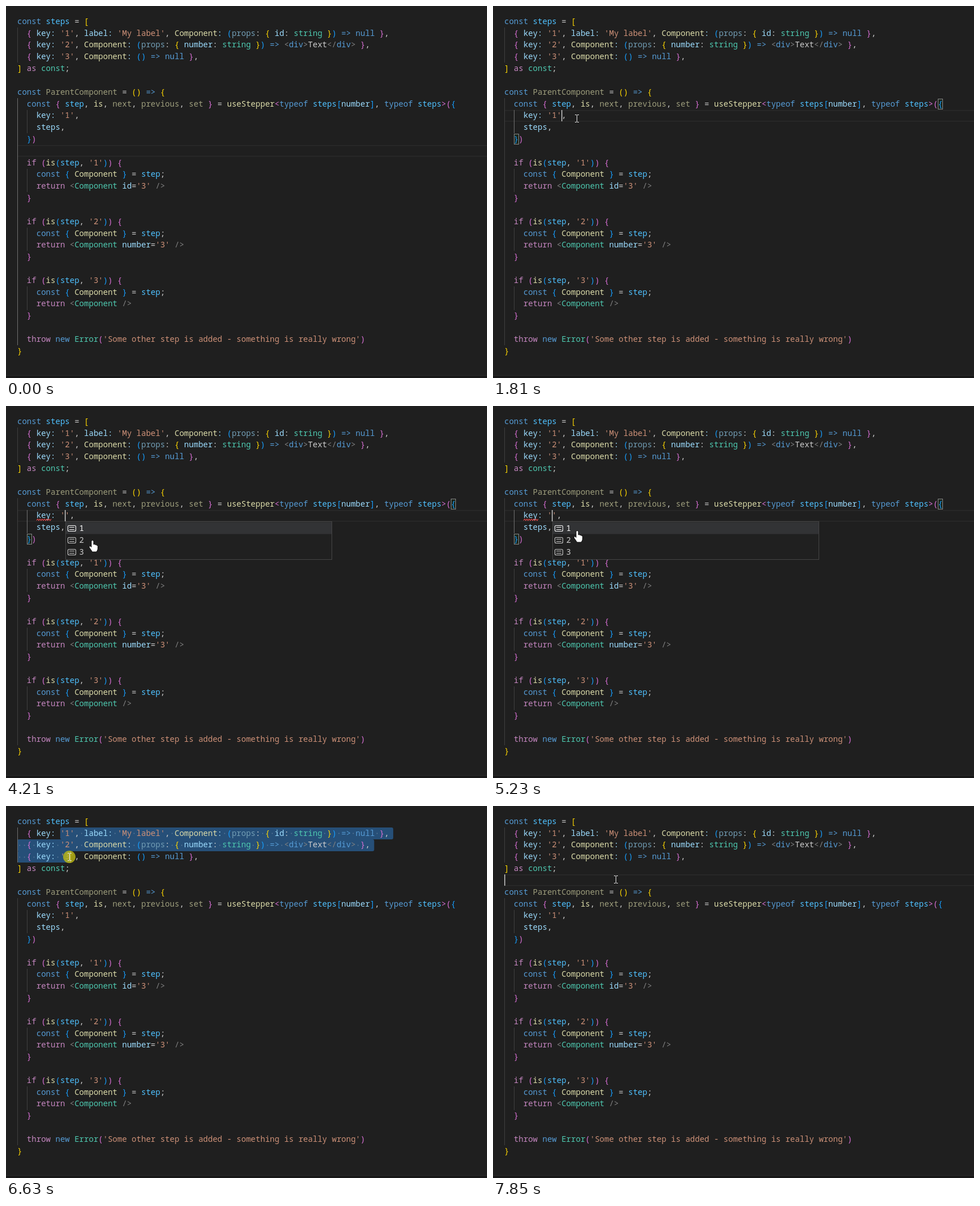
Write an HTML page with a canvas that moves like this. It is 851 px wide and 658 px high and loops after 8000 ms.

```html
<!DOCTYPE html>
<html lang="en">
<head>
<meta charset="utf-8">
<title>Typed stepper</title>
<style>
html, body { margin: 0; width: 100%; height: 100%; overflow: hidden; background: #1f1f1f; }
canvas { display: block; }
</style>
</head>
<body>
<canvas id="stage" width="851" height="658"></canvas>
<script>
const ctx = document.getElementById('stage').getContext('2d');
const LOOP = 8000, LEFT = 20, TOP = 17.2, BASELINE = 31.85, CHAR = 8.431, ROW = 20.814;
const FONT = '14.05px "Noto Sans Mono", "DejaVu Sans Mono", monospace';
const KEY_ROW = 8;

const COLORS = {
  k: '#569cd6', v: '#4fc1ff', p: '#9cdcfe', s: '#ce9178', f: '#dcdcaa',
  t: '#4ec9b0', c: '#c586c0', w: '#cccccc', g: '#808080', u: '#9d9d7c',
  q: '#729db4', 1: '#ffd700', 2: '#da70d6', 3: '#179fff'
};

// "~x" switches to colour x
const branch = (key, attr) => [
  `  ~cif ~2(~fis~3(~vstep~w, ~s'${key}'~3)~2) {`,
  '    ~kconst ~3{ ~fComponent ~3} ~w= ~vstep~w;',
  `    ~creturn ~g<~tComponent ${attr ? `~p${attr}~w=~s'3' ` : ''}~g/>`,
  '  ~2}',
  ''
];
const SOURCE = [
  '~kconst ~vsteps ~w= ~1[',
  "  ~2{ ~pkey: ~s'1'~w, ~plabel: ~s'My label'~w, ~fComponent~p: ~3(~qprops~w: ~1{ ~pid~w: ~tstring ~1}~3) ~k=> null ~2}~w,",
  "  ~2{ ~pkey: ~s'2'~w, ~fComponent~p: ~3(~qprops~w: ~1{ ~pnumber~w: ~tstring ~1}~3) ~k=> ~g<~kdiv~g>~wText~g</~kdiv~g> ~2}~w,",
  "  ~2{ ~pkey: ~s'3'~w, ~fComponent~p: ~3() ~k=> null ~2}~w,",
  '~1] ~cas ~tconst~w;',
  '',
  '~kconst ~uParentComponent ~w= ~1() ~k=> ~1{',
  '  ~kconst ~2{ ~vstep~w, ~fis~w, ~unext~w, ~uprevious~w, ~uset ~2} ~w= ~fuseStepper~2<~ktypeof ~vsteps~3[~pnumber~3]~w, ~ktypeof ~vsteps~2>(~3{',
  "    ~pkey: ~s'1'~w,",
  '    ~psteps~w,',
  '  ~3}~2)',
  '',
  ...branch(1, 'id'), ...branch(2, 'number'), ...branch(3, ''),
  "  ~cthrow ~knew ~tError~2(~s'Some other step is added - something is really wrong'~2)",
  '~1}'
];

function parse(line) {
  const cells = [];
  let color = COLORS.w;
  for (let i = 0; i < line.length; i++) {
    if (line[i] === '~') color = COLORS[line[++i]];
    else cells.push({ ch: line[i], color });
  }
  return cells;
}
const CODE = SOURCE.map(parse);
const EMPTY_KEY = parse("    ~pkey: ~s''~w,");

// column, first row, last row
const GUIDES = [[0, 1, 3], [0, 7, 27], [2, 8, 9], [2, 13, 14], [2, 18, 19], [2, 23, 24]];
const CALL = [[7, 91], [10, 2]], ITEM = [[1, 2], [1, 76]];

// Each step keeps what the one before it set.
const STEPS = [
  [0, { line: 11, guide: 1 }],
  [200, { mouse: [437, 278] }],
  [400, { mouse: [352, 262] }],
  [600, { mouse: [262, 244] }],
  [800, { mouse: [196, 230] }],
  [1010, { mouse: [156, 220] }],
  [1210, { mouse: [141, 216] }],
  [1410, { mouse: [147, 201] }],
  [1610, { mouse: [148, 199], press: true, line: 8, caret: [8, 12], guide: 2, pair: CALL }],
  [1810, { press: false }],
  [2210, { caret: [8, 11] }],
  [2410, { caret: [8, 10], empty: true }],
  [2810, { popup: true }],
  [3410, { error: true }],
  [3610, { mouse: [148, 208] }],
  [3810, { mouse: [150, 222], hand: true }],
  [4030, { mouse: [153, 238] }],
  [4230, { mouse: [155, 248] }],
  [4430, { mouse: [155, 253] }],
  [4630, { mouse: [154, 250] }],
  [4830, { mouse: [153, 243] }],
  [5030, { mouse: [151, 231] }],
  [5230, { mouse: [149, 221] }],
  [5430, { press: true, popup: false, empty: false, caret: [8, 11] }],
  [5630, { press: false, hand: false, mouse: [119, 60] }],
  [5830, { mouse: [99, 50], error: false }],
  [6030, { press: true, line: 1, caret: [1, 9], guide: 0, pair: ITEM }],
  [6230, { mouse: [104, 49], line: -1, caret: [1, 10], select: [1, 10], quotes: true }],
  [6430, { mouse: [108, 70], caret: [2, 10], select: [2, 10], quotes: false, pair: [] }],
  [6630, { mouse: [112, 90], caret: [3, 11], select: [3, 11] }],
  [6830, { press: false, bulb: true }],
  [7230, { mouse: [172, 116] }],
  [7430, { mouse: [212, 133], caret: null }],
  [7650, { mouse: [217, 130], press: true, select: null, bulb: false, line: 5, caret: [5, 0], guide: -1 }],
  [7850, { press: false }]
];

const colX = c => LEFT + c * CHAR;
const rowY = r => Math.round(TOP + r * ROW);

function fill(x, y, w, h, color) {
  ctx.fillStyle = color;
  ctx.fillRect(x, y, w, h);
}
function disc(x, y, r, color) {
  ctx.fillStyle = color;
  ctx.beginPath();
  ctx.arc(x, y, r, 0, Math.PI * 2);
  ctx.fill();
}
function stroke(points, color, width) {
  ctx.strokeStyle = color;
  ctx.lineWidth = width;
  ctx.beginPath();
  points.forEach(([x, y]) => ctx.lineTo(x, y));
  ctx.stroke();
}
function glyph(ch, x, row, color) {
  ctx.fillStyle = color;
  ctx.fillText(ch, x, Math.round(BASELINE + row * ROW));
}

function drawLine(row) {
  const y = rowY(row);
  fill(LEFT, y, 851 - LEFT, 1.5, '#2a2a2a');
  fill(LEFT, y + 19, 851 - LEFT, 1.5, '#2a2a2a');
}

function drawSelection([endRow, endCol], rows) {
  for (let r = 1; r <= endRow; r++) {
    const from = r === 1 ? 9 : 0;
    const to = r === endRow ? endCol : rows[r].length;
    const tail = r === endRow ? 0 : 7.5;
    ctx.fillStyle = '#264f78';
    ctx.beginPath();
    ctx.roundRect(colX(from), rowY(r), (to - from) * CHAR + tail, rowY(r + 1) - rowY(r), 3);
    ctx.fill();
    for (let c = from; c < to; c++) {
      if (rows[r][c].ch === ' ') disc(colX(c + 0.5), rowY(r) + 10.5, 0.9, '#5b7a98');
    }
  }
}

function drawQuotes(rows) {
  rows.forEach((cells, r) => cells.forEach(({ ch }, c) => {
    if (ch === "'") fill(colX(c), rowY(r), CHAR, 20.5, '#363b40');
  }));
}

function drawGuides(active) {
  GUIDES.forEach(([col, first, last], i) => {
    const y = rowY(first);
    fill(Math.round(colX(col)), y, 1, rowY(last + 1) - y, i === active ? '#707070' : '#404040');
  });
}

function drawPair(pair) {
  ctx.lineWidth = 1;
  ctx.strokeStyle = '#888888';
  for (const [r, c] of pair) {
    const x = Math.round(colX(c)), y = rowY(r) + 1;
    fill(x, y, 9, 19, 'rgba(0,100,0,.1)');
    ctx.strokeRect(x + 0.5, y + 0.5, 8, 18);
  }
}

function drawError() {
  const wave = [];
  for (let x = 54; x <= 80; x += 2) wave.push([x, x % 4 ? 202.5 : 200]);
  stroke(wave, '#f14c4c', 1.1);
}

function drawPopup() {
  fill(105, 204, 472, 68, '#454545');
  fill(106, 205, 470, 66, '#202020');
  fill(106, 205.5, 470, 21, '#323335');
  for (let i = 0; i < 3; i++) {
    const y = Math.round(216 + i * ROW), color = i ? '#cccccc' : '#ffffff';
    ctx.strokeStyle = color;
    ctx.lineWidth = 1.1;
    ctx.beginPath();
    ctx.roundRect(109.5, y - 4.5, 14, 10, 2);
    ctx.stroke();
    fill(112, y - 2, 9, 1, color);
    fill(112, y + 2, 9, 1, color);
    ctx.fillStyle = color;
    ctx.fillText(i + 1, 129.5, y + 5);
  }
}

function drawBulb() {
  disc(28, 24, 6, '#75beff');
  fill(25, 28, 6, 5, '#75beff');
  disc(33, 30, 4.5, '#1f1f1f');
  disc(33, 30, 3.6, '#75beff');
  disc(33, 30, 1.2, '#1f1f1f');
}

function drawBeam(x, y) {
  const color = '#e8e8e8';
  fill(x, y - 6, 1, 12, color);
  for (const edge of [y - 7, y + 6]) {
    fill(x - 3, edge, 3, 1, color);
    fill(x + 1, edge, 3, 1, color);
  }
}

function drawHand(x, y) {
  ctx.save();
  ctx.translate(x, y);
  const shape = new Path2D('M-2 1.5Q-2-.5 0-.5T2 1.5V7Q4 5.5 5 7.5Q7 6.5 7.5 8.5Q9.5 8 9.5 10.5V14Q9.5 17 7 20H-.5Q-2 17-5.5 12.5Q-6.5 10-4.5 9.8Q-3 10-2 11.5Z');
  ctx.fillStyle = '#ffffff';
  ctx.fill(shape);
  ctx.strokeStyle = '#000000';
  ctx.lineWidth = 0.9;
  ctx.stroke(shape);
  ctx.restore();
}

function draw(time) {
  const s = { pair: [] };
  for (const [start, change] of STEPS) if (start <= time) Object.assign(s, change);
  const rows = CODE.map((cells, r) => s.empty && r === KEY_ROW ? EMPTY_KEY : cells);

  fill(0, 0, 851, 658, '#1f1f1f');
  fill(0, 653, 851, 1, '#2b2b2b');
  fill(0, 654, 851, 4, '#181818');
  if (s.line >= 0) drawLine(s.line);
  if (s.quotes) drawQuotes(rows);
  if (s.select) drawSelection(s.select, rows);
  drawGuides(s.guide);
  drawPair(s.pair);

  ctx.font = FONT;
  rows.forEach((cells, r) => cells.forEach(({ ch, color }, c) => {
    if (ch !== ' ') glyph(ch, colX(c), r, color);
  }));
  if (s.error) drawError();
  if (s.caret) fill(Math.round(colX(s.caret[1])), rowY(s.caret[0]), 1.5, 20, '#c8c8c8');
  if (s.popup) drawPopup();
  if (s.bulb) drawBulb();
  if (!s.mouse) return;
  if (s.press) disc(...s.mouse, 11, 'rgba(190,185,20,.8)');
  (s.hand ? drawHand : drawBeam)(...s.mouse);
}

const begin = performance.now();
function tick() {
  draw((performance.now() - begin) % LOOP);
  requestAnimationFrame(tick);
}
tick();
</script>
</body>
</html>
```
